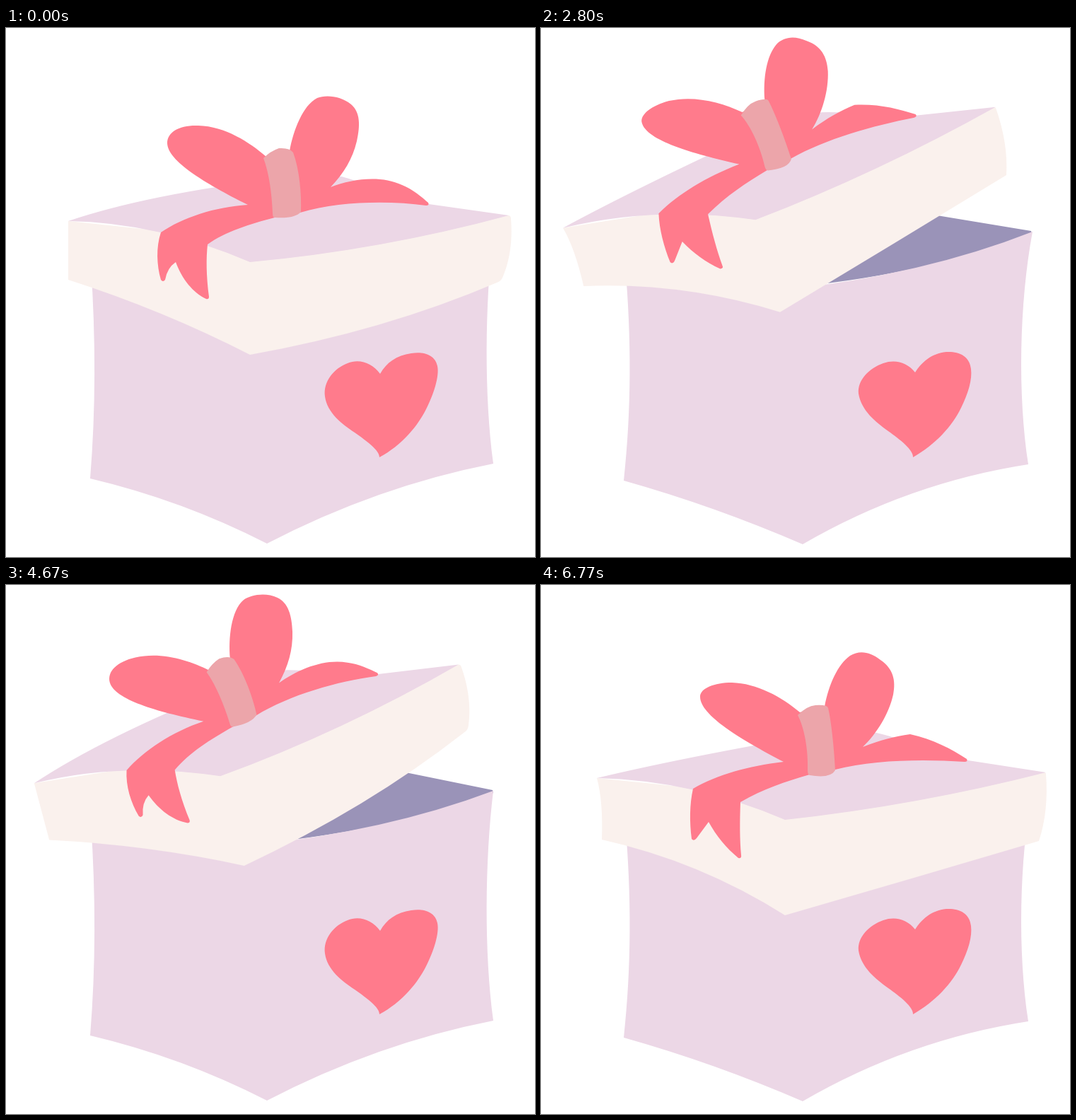
An HTML page with a canvas that plays this animation: 748x748 px, repeating every 6810 ms.

```html
<!DOCTYPE html>
<html lang="en">
<head>
<meta charset="utf-8">
<title>Gift box</title>
<style>
  html, body { margin: 0; width: 100%; height: 100%; overflow: hidden; background: #fff; }
  canvas { display: block; width: 748px; height: 748px; }
</style>
</head>
<body>
<canvas id="stage" width="748" height="748"></canvas>
<script>
const ctx = document.getElementById('stage').getContext('2d');

const LOOP_MS = 6810;
const TICK_MS = 100 / 3;
const HALF = 102;                       // ticks in one open-and-close cycle
const OPEN_START = 30, CLOSE_START = 95, SWING = 6;
const LID = { x: 372, y: 333, dx: -42.3, dy: -67.7, turn: -14.9 * Math.PI / 180 };

const COLORS = {
  inside: '#9a93b8', body: '#ecd7e6', heart: '#ff7b8c',
  rim: '#faf1ed', top: '#ecd7e6', ribbon: '#ff7b8c', knot: '#eca5aa'
};

// Two hand-drawn versions of every part; they alternate to make the line wobble.
const drawings = [
  {
    inside: 'M330 368 L520 255 L570 266 L688 290 L689 294 Q540 350 330 368Z',
    body: 'M120 335 C127 440 127 540 119 637 Q250 668 369 729 Q525 648 689 616 C676 520 677 390 689 291 Q535 349 345 368Z',
    heart: 'M529 489 C518 474 500 467 483 474 C464 481 448 500 451 521 C454 544 475 560 493 572 C510 584 528 597 528 607 C560 590 583 562 595 537 C605 517 613 492 610 478 C607 462 590 457 573 460 C552 463 538 473 529 489Z',
    rim: 'M88 273 L88 356 Q222 399 345 462 Q535 428 694 360 Q700 358 702 353 C710 335 717 307 714 270 Q714 265 710 265 L345 300Z',
    top: 'M88 273 Q200 235 390 212 L474 210 Q490 214 598 249 L711 265 Q530 314 345 331 Q215 275 88 273Z',
    ribbon: 'M368 182 C345 162 310 139 272 138 C245 137 228 147 228 163 C229 188 280 219 342 250 C295 253 250 268 219 289 C212 310 213 335 219 356 Q222 360 225 356 Q228 339 240 331 C249 355 264 374 283 383 Q287 384 287 380 C283 350 283 325 285 306 C310 288 345 277 380 268 L416 261 C470 245 540 244 594 251 Q599 251 597 247 C588 239 575 228 560 222 C530 208 490 213 459 225 C478 205 490 185 496 160 C501 138 501 119 488 108 C474 96 452 94 440 99 C420 109 406 145 401 174Z',
    knot: 'M364 184 Q374 174 386 170 Q401 169 406 176 C415 200 418 235 417 260 Q408 270 380 268 Q377 268 377 262 C376 235 372 205 364 184Z'
  },
  {
    inside: 'M330 369 L520 258 L566 266 L693 287 L694 291 Q540 351 330 369Z',
    body: 'M119 335 C128 440 128 540 117 640 Q245 676 370 730 Q520 643 689 617 C674 520 676 390 695 288 Q540 349 345 370Z',
    heart: 'M529 487 C518 473 501 468 484 474 C464 481 447 498 449 517 C453 541 473 557 491 570 C508 582 527 597 526 607 C558 589 582 562 594 537 C604 517 610 497 608 482 C606 463 590 457 573 458 C552 460 538 473 529 487Z',
    rim: 'M79 273 Q88 306 86 360 Q225 391 345 467 Q525 415 704 362 Q718 320 714 267 Q714 265 710 265 L345 300Z',
    top: 'M79 273 Q200 244 390 211 L474 209 Q490 212 604 248 L714 265 Q530 312 345 332 Q215 276 79 273Z',
    ribbon: 'M366 180 C340 158 305 139 270 138 C245 138 225 146 225 158 C225 184 282 218 343 250 C292 256 250 268 215 288 C210 310 210 335 213 359 Q216 363 220 358 L237 335 C248 355 262 372 279 386 Q284 387 283 382 C281 360 281 335 282 307 C315 288 345 278 380 268 L416 261 C470 247 540 246 599 250 Q604 250 602 246 C580 232 555 218 522 211 C500 214 480 219 455 229 C475 210 492 182 498 155 C502 135 498 118 480 106 C465 94 450 92 437 100 C420 112 407 140 401 172Z',
    knot: 'M363 184 Q376 171 388 170 Q405 169 406 174 C411 195 415 238 416 262 Q409 274 380 269 Q377 268 377 262 C378 235 373 203 363 184Z'
  }
].map(parts => Object.fromEntries(
  Object.entries(parts).map(([name, path]) => [name, new Path2D(path)])));

const clamp01 = v => Math.max(0, Math.min(1, v));

// Wobble steps: idle rhythm is 4, 4, 4, 3, 3 ticks.
const IDLE = [0, 4, 8, 12, 15];
const idleStep = n => 5 * Math.floor(n / 18) + IDLE.filter(s => s <= n % 18).length - 1;
const openingStep = n => [4, 8, 11, 15].filter(s => s <= n).length;

function drawingAt(n) {
  if (n < 30) return idleStep(n) % 2;
  if (n < 48) return openingStep(n - 30) % 2;
  if (n < 96) return (idleStep(n - 48) + 1) % 2;
  return n < 100 ? 0 : 1;
}

function openness(n) {
  return clamp01((n - OPEN_START) / SWING) - clamp01((n - CLOSE_START) / SWING);
}

function paint(parts, names) {
  for (const name of names) {
    ctx.fillStyle = COLORS[name];
    ctx.fill(parts[name]);
  }
}

function render(ms) {
  const tick = Math.min(2 * HALF - 1, Math.floor((ms % LOOP_MS + 3.4) / TICK_MS));
  const n = tick % HALF;
  const parts = drawings[drawingAt(n)];
  const open = openness(n);

  ctx.fillStyle = '#fff';
  ctx.fillRect(0, 0, 748, 748);
  paint(parts, ['inside', 'body', 'heart']);

  ctx.save();
  ctx.translate(LID.x + LID.dx * open, LID.y + LID.dy * open);
  ctx.rotate(LID.turn * open);
  ctx.translate(-LID.x, -LID.y);
  paint(parts, ['rim', 'top', 'ribbon', 'knot']);
  ctx.restore();
}

const start = performance.now();
function loop() {
  render(performance.now() - start);
  requestAnimationFrame(loop);
}
loop();
</script>
</body>
</html>
```
